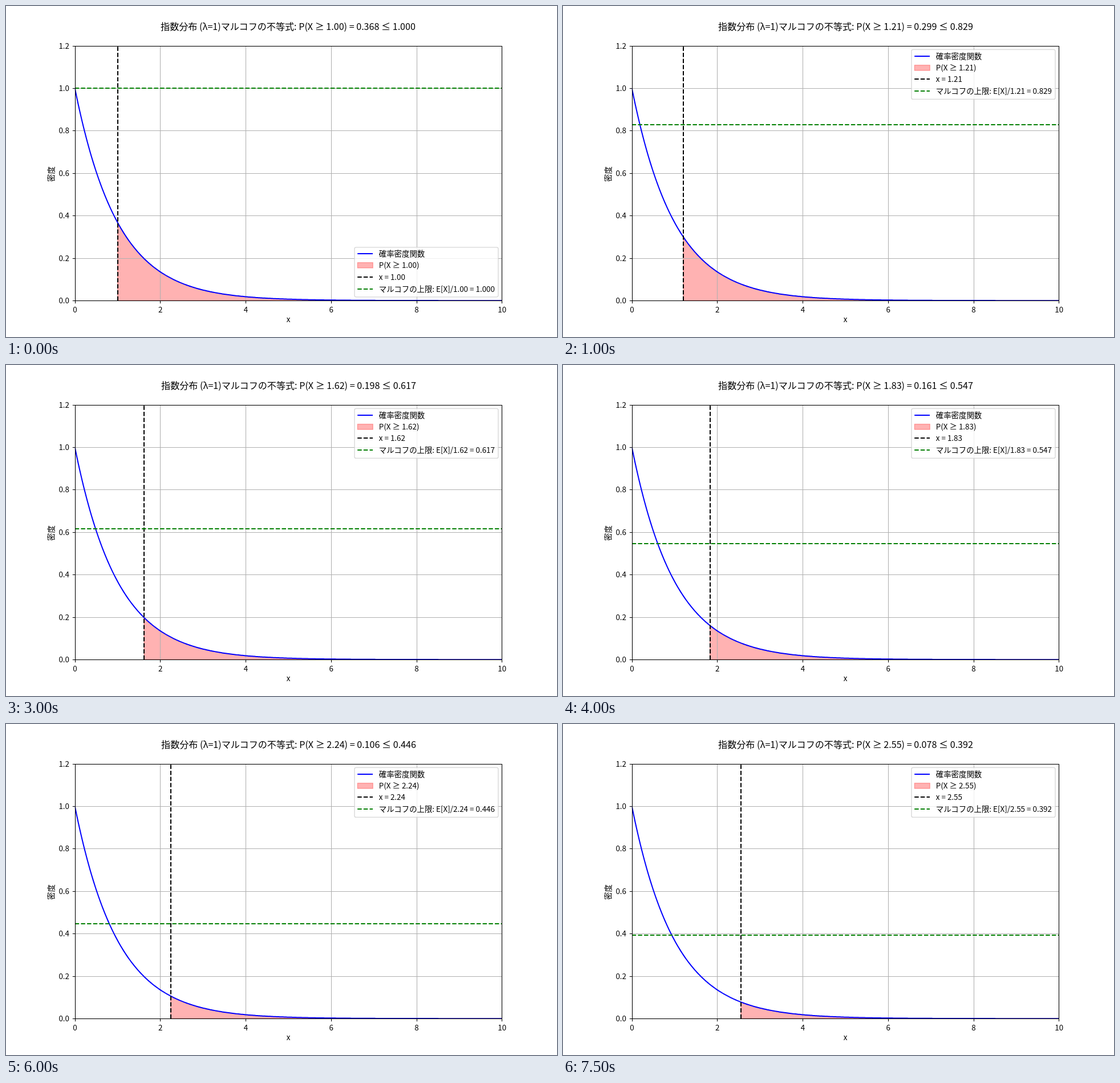
Animation, 966 px wide and 580 px high, one loop 8 s. Source, as an HTML page:

```html
<!DOCTYPE html>
<html lang="ja">
<head>
<meta charset="utf-8">
<title>指数分布</title>
<style>
  html, body { margin: 0; width: 100%; height: 100%; overflow: hidden; background: #fff; }
  svg { display: block; width: 966px; height: 580px; }
  text {
    font: 13.42px "Noto Sans CJK JP", "Noto Sans CJK", "Noto Sans", sans-serif;
    fill: #000;
    text-autospace: no-autospace;
  }
  .title { font-size: 16.1px; }
  .mid { text-anchor: middle; }
  .end { text-anchor: end; }
  .grid { stroke: #b0b0b0; stroke-width: 1.07; }
  .axis { stroke: #000; stroke-width: 1.07; fill: none; }
  .line { stroke-width: 2; fill: none; }
  .dash { stroke-dasharray: 7.45 3.22; }
  .area { fill: #f00; fill-opacity: .3; stroke: #f00; stroke-opacity: .3; stroke-width: 1.34; }
  .box { fill: #fff; fill-opacity: .8; stroke: #ccc; stroke-opacity: .8; stroke-width: 1.34; }
</style>
</head>
<body>
<svg id="stage" viewBox="0 0 966 580"></svg>
<script>
const STEP = 500, STEPS = 16;
const LEFT = 120.75, RIGHT = 869.4, TOP = 69.6, BOTTOM = 516.2;
const BLUE = '#0000ff', GREEN = '#008000', BLACK = '#000';
const stage = document.getElementById('stage');

const px = x => LEFT + x * (RIGHT - LEFT) / 10;
const py = y => BOTTOM - y * (BOTTOM - TOP) / 1.2;
const snap = v => Math.round(v) + 0.5;
const density = x => Math.exp(-x);

function add(tag, attrs, parent = stage) {
  const el = document.createElementNS('http://www.w3.org/2000/svg', tag);
  set(el, attrs);
  parent.append(el);
  return el;
}
function set(el, attrs) {
  for (const key in attrs) el.setAttribute(key, attrs[key]);
}
function label(text, x, y, cls = '', parent = stage) {
  const el = add('text', { x, y, class: cls }, parent);
  el.textContent = text;
  return el;
}
function line(x1, y1, x2, y2, cls, stroke, parent = stage) {
  const el = add('line', { x1, y1, x2, y2, class: cls }, parent);
  if (stroke) el.setAttribute('stroke', stroke);
  return el;
}
function curve(from) {
  let d = '';
  for (let i = 0; i <= 400; i++) {
    const x = from + (10 - from) * i / 400;
    d += (i ? 'L' : 'M') + px(x).toFixed(2) + ' ' + py(density(x)).toFixed(2);
  }
  return d;
}

const clip = add('clipPath', { id: 'plot' }, add('defs', {}));
add('rect', { x: LEFT, y: TOP, width: RIGHT - LEFT, height: BOTTOM - TOP }, clip);
const clipped = () => add('g', { 'clip-path': 'url(#plot)' });

const area = add('path', { class: 'area' }, clipped());

const [x0, x1, y0, y1] = [LEFT, RIGHT, BOTTOM, TOP].map(snap);
for (let x = 0; x <= 10; x += 2) {
  const gx = snap(px(x));
  line(gx, y0, gx, y1, 'grid');
  line(gx, y0, gx, y0 + 4.7, 'axis');
  label(x, px(x) + 0.3, 536.5, 'mid');
}
for (let i = 0; i <= 6; i++) {
  const y = py(i / 5), gy = snap(y);
  line(x0, gy, x1, gy, 'grid');
  line(x0 - 4.7, gy, x0, gy, 'axis');
  label((i / 5).toFixed(1), 111, Math.round(y) + 5, 'end');
}

const plot = clipped();
add('path', { class: 'line', stroke: BLUE, d: curve(0) }, plot);
const vline = line(0, BOTTOM, 0, TOP, 'line dash', BLACK, plot);
const hline = line(LEFT, 0, RIGHT, 0, 'line dash', GREEN, plot);
add('rect', { x: x0, y: y0 - (y0 - y1), width: x1 - x0, height: y0 - y1, class: 'axis' });

label('x', 495, 554, 'mid');
set(label('密度', 0, 0, 'mid'), { transform: 'translate(84 294.5) rotate(-90)' });
const title = label('', 495.5, 42, 'title mid');

// Legend
const legend = add('g', {});
const box = add('rect', { x: 611, width: 252, height: 87, rx: 2.7, class: 'box' }, legend);
const BASE = [92.7, 112.9, 133.2, 154.4];
const key = (cls, color) => line(616.2, 0, 643, 0, cls, color, legend);
const keys = [
  key('line', BLUE),
  add('rect', { x: 616.4, width: 26.8, height: 9.4, class: 'area' }, legend),
  key('line dash', BLACK),
  key('line dash', GREEN)
];
const names = BASE.map(() => label('', 653.8, 0, '', legend));

function placeLegend(dy) {
  box.setAttribute('y', 76.4 + dy);
  BASE.forEach((base, i) => {
    const b = Math.round(base + dy);
    names[i].setAttribute('y', b);
    if (i === 1) keys[i].setAttribute('y', b - 9.4);
    else set(keys[i], { y1: b - 5, y2: b - 5 });
  });
}

let shown = -1;
function draw(k) {
  const a = 1 + k * 3 / 29, bound = 1 / a;
  const at = a.toFixed(2), limit = bound.toFixed(3);

  area.setAttribute('d', curve(a) + `L${RIGHT} ${BOTTOM}L${px(a)} ${BOTTOM}Z`);
  const vx = Math.round(px(a)), hy = Math.round(py(bound));
  set(vline, { x1: vx, x2: vx });
  set(hline, { y1: hy, y2: hy });

  title.textContent =
    `指数分布 (λ=1)マルコフの不等式: P(X ≥ ${at}) = ${density(a).toFixed(3)} ≤ ${limit}`;
  title.setAttribute('x', k ? 495.5 : 494.5);

  [
    '確率密度関数',
    `P(X ≥ ${at})`,
    `x = ${at}`,
    `マルコフの上限: E[X]/${at} = ${limit}`
  ].forEach((text, i) => { names[i].textContent = text; });
  placeLegend(k ? 0 : 346.4);
}

const start = performance.now();
function tick() {
  const k = Math.floor((performance.now() - start) / STEP) % STEPS;
  if (k !== shown) draw(shown = k);
  requestAnimationFrame(tick);
}
tick();
</script>
</body>
</html>
```
